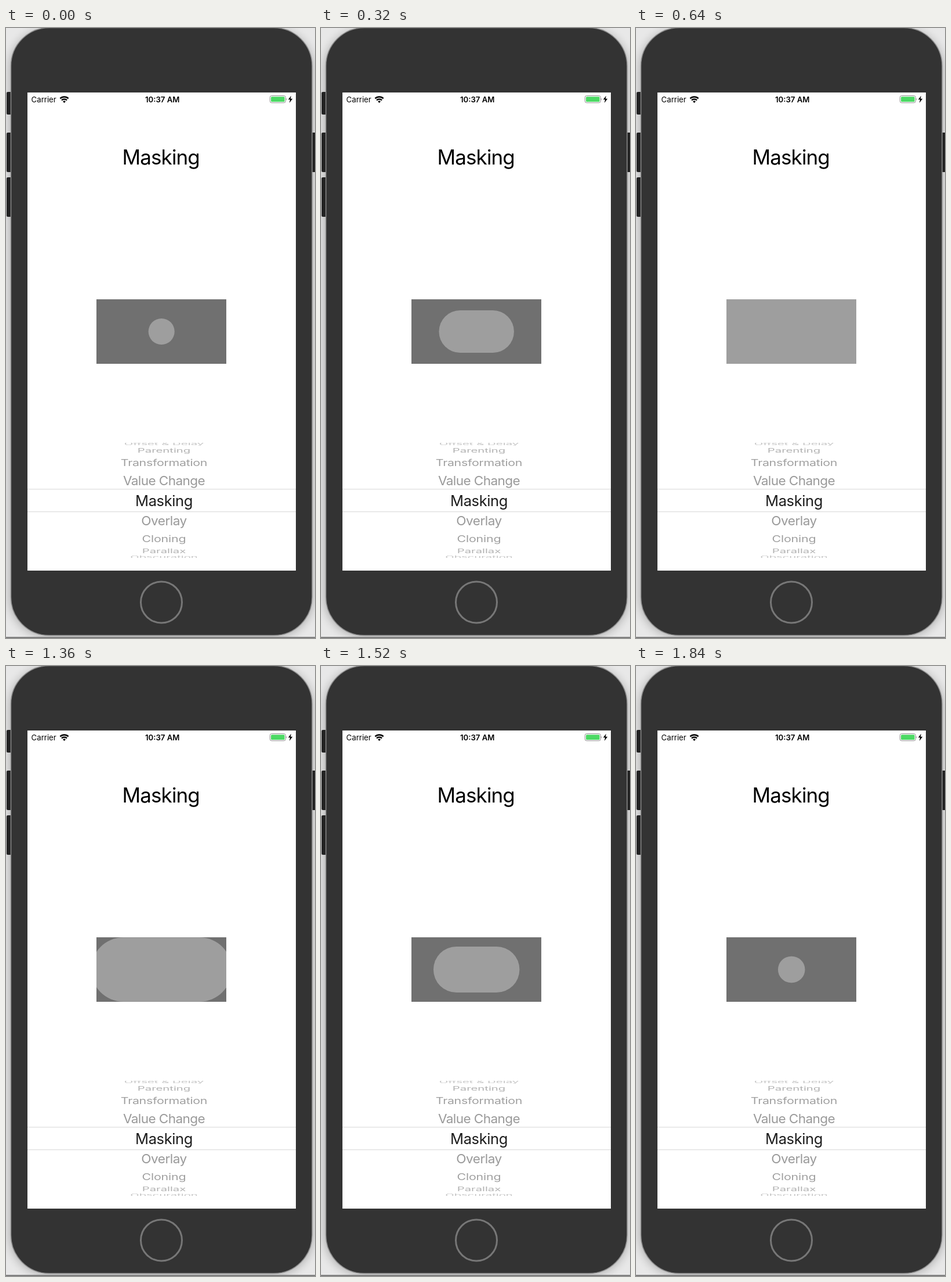
Recreate the animation shown at these times as an HTML page. Size 533 px wide and 1050 px high, loop 1.92 s.

```html
<!DOCTYPE html>
<html lang="en">
<head>
<meta charset="utf-8">
<title>Masking</title>
<style>
  html, body { margin: 0; width: 100%; height: 100%; overflow: hidden; background: #e4e4e4; }
  svg { display: block; width: 533px; height: 1050px; font-family: Inter, Roboto, "Liberation Sans", sans-serif; }
  text { text-anchor: middle; }
</style>
</head>
<body>
<svg viewBox="0 0 533 1050">
  <defs>
    <filter id="blur" x="-10%" y="-10%" width="120%" height="120%"><feGaussianBlur stdDeviation="9"/></filter>
    <clipPath id="card"><rect x="156" y="467" width="224" height="111"/></clipPath>
    <clipPath id="wheel"><rect x="37" y="714" width="463" height="198"/></clipPath>
  </defs>

  <!-- phone -->
  <rect width="533" height="1050" fill="#e8e8e8"/>
  <rect x="8" y="4" width="520" height="1042" rx="66" opacity=".32" filter="url(#blur)"/>
  <rect y="1048" width="533" height="2" fill="#808080"/>
  <g fill="#222">
    <rect x="1" y="110" width="10" height="39" rx="2"/>
    <rect x="1" y="180" width="10" height="68" rx="2"/>
    <rect x="1" y="257" width="10" height="68" rx="2"/>
    <rect x="525" y="180" width="10" height="68" rx="2"/>
  </g>
  <rect x="8.5" y="-.5" width="519.5" height="1046" rx="66" fill="#333" stroke="#8c8c8c" stroke-width="1.5"/>
  <circle cx="268" cy="988.5" r="35.5" fill="none" stroke="#777" stroke-width="3"/>
  <rect x="37" y="111" width="463" height="823" fill="#fff"/>

  <!-- status bar -->
  <text x="65.2" y="127.5" font-size="13.2">Carrier</text>
  <text x="269.7" y="127.5" font-size="13.2" font-weight="600">10:37 AM</text>
  <g fill="none" stroke="#000" stroke-width="2.5">
    <path d="M93.4 121.4a10 10 0 0 1 14.2 0M96 124.4a6.4 6.4 0 0 1 9 0"/>
    <path d="M100.5 129l-2.4-2.5a3.5 3.5 0 0 1 4.8 0z" fill="#000" stroke="none"/>
  </g>
  <rect x="455.3" y="116.5" width="27" height="12.2" rx="3" fill="none" stroke="#8e8e8e"/>
  <rect x="457" y="118.2" width="23.6" height="8.8" rx="1.5" fill="#4cd964"/>
  <path d="M483.4 120.6q1.6 2 0 4z" fill="#8e8e8e"/>
  <path d="M491.8 116.5l-5 6.8h3.2l-1.2 5.7 5.4-7.2h-3.4z"/>

  <text x="267.2" y="235" font-size="35" letter-spacing="-.9">Masking</text>

  <!-- masked card -->
  <rect x="156" y="467" width="224" height="111" fill="#707070"/>
  <g clip-path="url(#card)"><rect id="pill" fill="#9e9e9e"/></g>

  <!-- picker -->
  <path d="M37 793.9h463M37 832.7h463" stroke="#d6d6d6"/>
  <g id="rows" clip-path="url(#wheel)"></g>
</svg>
<script>
  // label, baseline, font size, letter spacing, vertical squash, colour
  const rows = [
    ["Offset & Delay", 718, 20.4, 0, .28, "#c4c4c4"],
    ["Parenting", 730.7, 20.3, 0, .5, "#b2b2b2"],
    ["Transformation", 754, 21.4, -.3, .76, "#a0a0a0"],
    ["Value Change", 786.5, 22.6, -.6, .95, "#999"],
    ["Masking", 822.8, 25.5, -.4, 1, "#1c1c1c"],
    ["Overlay", 856.4, 22.6, -.5, .95, "#999"],
    ["Cloning", 884.6, 21.4, -.2, .76, "#a0a0a0"],
    ["Parallax", 904, 20.3, 0, .5, "#b2b2b2"],
    ["Obscuration", 912.8, 20.2, 0, .28, "#c4c4c4"]
  ];
  const wheel = document.getElementById("rows");
  for (const [label, y, size, spacing, squash, fill] of rows) {
    const text = document.createElementNS("http://www.w3.org/2000/svg", "text");
    text.textContent = label;
    set(text, {
      transform: `translate(272.5 ${y}) scale(1 ${squash})`,
      "font-size": size, "letter-spacing": spacing, fill
    });
    wheel.append(text);
  }

  const LOOP = 1920, TICK = 80, DURATION = 937;
  const pill = document.getElementById("pill");

  function set(node, attrs) {
    for (const name in attrs) node.setAttribute(name, attrs[name]);
  }

  // cubic-bezier(.42, 0, .58, 1), solved by bisection
  function easeInOut(x) {
    if (x <= 0) return 0;
    if (x >= 1) return 1;
    let lo = 0, hi = 1, s;
    for (let i = 0; i < 24; i++) {
      s = (lo + hi) / 2;
      const at = 1.26 * s * (1 - s) ** 2 + 1.74 * s * s * (1 - s) + s ** 3;
      if (at < x) lo = s; else hi = s;
    }
    return s * s * (3 - 2 * s);
  }

  function reveal(t) {
    if (t < 640) return easeInOut((t + 10) / DURATION);
    if (t < 1360) return 1;
    return easeInOut((1886 - t) / DURATION);
  }

  function draw(now) {
    const t = Math.floor((now % LOOP) / TICK) * TICK;
    const p = reveal(t);
    const width = 45 + 326.5 * p, height = 45 + 108 * p;
    set(pill, { x: 268.2 - width / 2, y: 522.5 - height / 2, width, height, rx: height / 2 });
  }

  const start = performance.now();
  function frame() {
    draw(performance.now() - start);
    requestAnimationFrame(frame);
  }
  frame();
</script>
</body>
</html>
```
